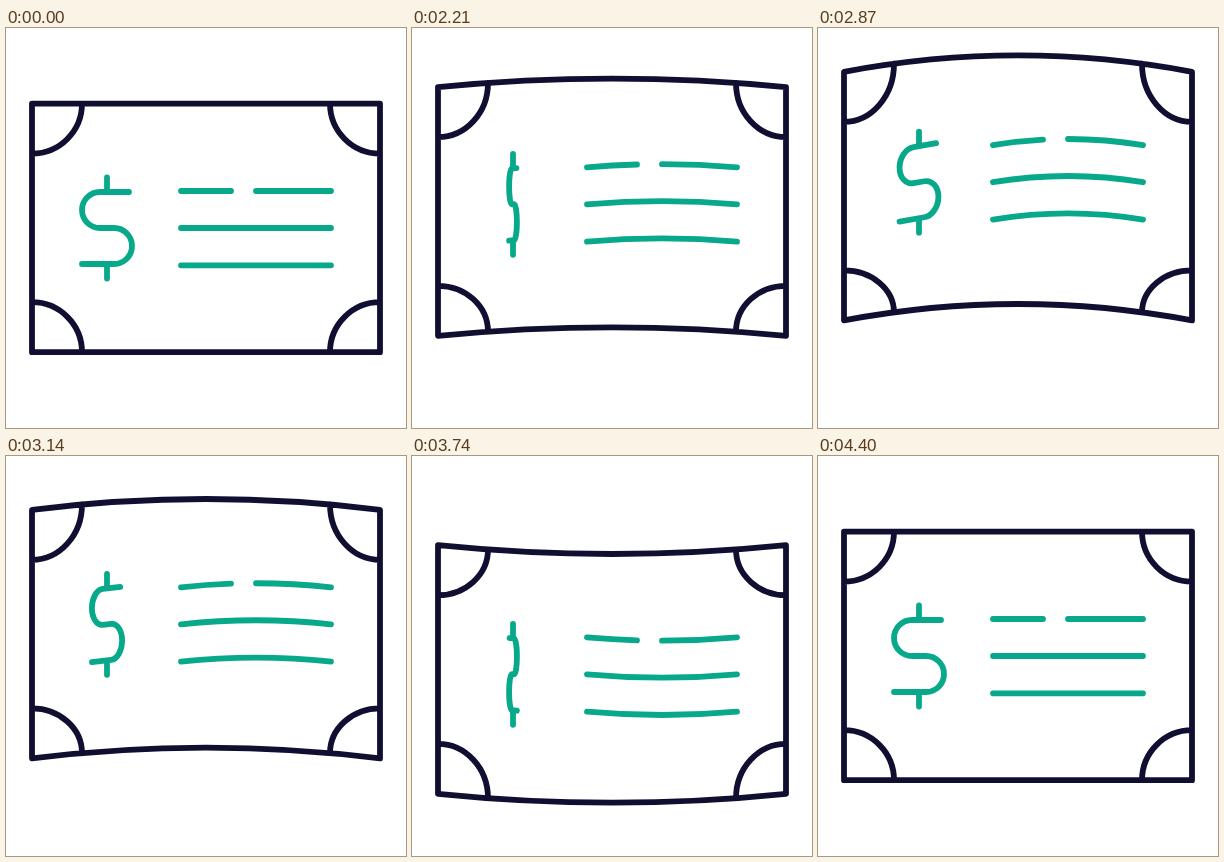
Animation of 400 by 400 pixels, one loop 4430 ms. Source, as an HTML page:

```html
<!DOCTYPE html>
<html lang="en">
<head>
<meta charset="utf-8">
<title>Waving bill</title>
<style>
  html, body { margin: 0; width: 100%; height: 100%; overflow: hidden; background: #fff; }
  svg { display: block; width: 100%; height: 100%; }
  path { fill: none; stroke-width: 5.8; stroke-linecap: round; stroke-linejoin: round; }
  .ink { stroke: #110f31; }
  .green { stroke: #08a88a; }
</style>
</head>
<body>
<svg viewBox="0 0 400 400">
  <path id="bill" class="ink"/>
  <path id="lines" class="green"/>
  <path id="stem" class="green"/>
  <path id="curl" class="green" vector-effect="non-scaling-stroke"
    d="M22 164H-7A18 18 0 0 0 -7 200H7A18 18 0 0 1 7 236H-25"/>
</svg>
<script>
const LOOP = 4430, REST = 2000, STEP = 30;
const LEFT = 26, RIGHT = 374, TOP = 75.6, BOTTOM = 324.2, CORNER = 50, COIN_X = 101;

// Poses: edge shift, bend of the sheet, shift of the printed content
const FLAT = [0, 0, 0], UP = [-31.8, -16.4, -45.8], DOWN = [13.9, 9, 18.8];
// Spin of the dollar sign: [ms, degrees]
const SPIN = [[0, 0], [390, 149], [870, 321], [1350, 484], [1740, 621], [2400, 720]];

const el = id => document.getElementById(id);
const bill = el('bill'), lines = el('lines'), stem = el('stem'), curl = el('curl');

const smooth = x => x * x * (3 - 2 * x);

// Cubic-bezier easing with y1 = 0 and y2 = 1
function ease(x, x1, x2) {
  let lo = 0, hi = 1;
  for (let i = 0; i < 24; i++) {
    const s = (lo + hi) / 2, r = 1 - s;
    if (3 * s * r * r * x1 + 3 * s * s * r * x2 + s * s * s < x) lo = s; else hi = s;
  }
  return smooth(lo);
}

const mix = (a, b, k) => a.map((v, i) => v + (b[i] - v) * k);

function pose(t) {
  if (t < 860) return mix(FLAT, UP, ease(t / 860, 0.25, 0.05));
  if (t < 1785) return mix(UP, DOWN, smooth((t - 860) / 925));
  return mix(DOWN, FLAT, smooth((t - 1785) / 615));
}

function slope(i) {
  if (i === 0) return 0.385;
  if (i === SPIN.length - 1) return 0;
  const a = SPIN[i - 1], b = SPIN[i + 1];
  return (b[1] - a[1]) / (b[0] - a[0]);
}

function spin(t) {
  let i = 0;
  while (i < SPIN.length - 2 && t > SPIN[i + 1][0]) i++;
  const [t0, a0] = SPIN[i], [t1, a1] = SPIN[i + 1];
  const d = t1 - t0, u = (t - t0) / d, r = 1 - u;
  return a0 + (a1 - a0) * smooth(u) + d * u * r * (slope(i) * r - slope(i + 1) * u);
}

function edge(y, bend) {
  return `M${LEFT} ${y}Q200 ${y + 2 * bend} ${RIGHT} ${y}`;
}

// Arc from the side of the sheet to its curved edge
function corner(x, y, dx, dy, bend) {
  const u = (x + dx - 200) / 174;
  const y0 = y + dy, y1 = y + bend * (1 - u * u);
  return `M${x} ${y0}A${CORNER} ${Math.abs(y1 - y0)} 0 0 ${dx * dy > 0 ? 0 : 1} ${x + dx} ${y1}`;
}

function rule(x0, x1, y, bend) {
  const at = x => y + bend * (1 - ((x - 250) / 75) ** 2);
  const xm = (x0 + x1) / 2, y0 = at(x0), y1 = at(x1);
  return `M${x0} ${y0}Q${xm} ${2 * at(xm) - (y0 + y1) / 2} ${x1} ${y1}`;
}

function draw(t) {
  const [shift, bend, lift] = pose(t);
  const top = TOP + shift, bottom = BOTTOM + shift, c = CORNER;

  bill.setAttribute('d',
    `${edge(top, bend)}V${bottom}Q200 ${bottom + 2 * bend} ${LEFT} ${bottom}Z` +
    corner(LEFT, top, c, c, bend) + corner(RIGHT, top, -c, c, bend) +
    corner(LEFT, bottom, c, -c, bend) + corner(RIGHT, bottom, -c, -c, bend));

  const sag = bend * 0.38;
  lines.setAttribute('d',
    rule(175, 225, 163 + lift, sag) + rule(250, 325, 163 + lift, sag) +
    rule(175, 325, 200 + lift, sag) + rule(175, 325, 237.3 + lift, sag));

  stem.setAttribute('d', `M${COIN_X} ${149.5 + lift}v14M${COIN_X} ${236.5 + lift}v14`);
  const s = Math.cos(spin(t) * Math.PI / 180);
  const sx = Math.abs(s) < 0.01 ? 0.01 : s;
  curl.setAttribute('transform', `matrix(${sx} ${sx * bend * 0.0107} 0 1 ${COIN_X} ${lift})`);
}

const start = performance.now();
function frame() {
  const t = (performance.now() - start) % LOOP;
  draw(Math.min(2400, Math.max(0, Math.floor((t - REST) / STEP) * STEP)));
  requestAnimationFrame(frame);
}
frame();
</script>
</body>
</html>
```
